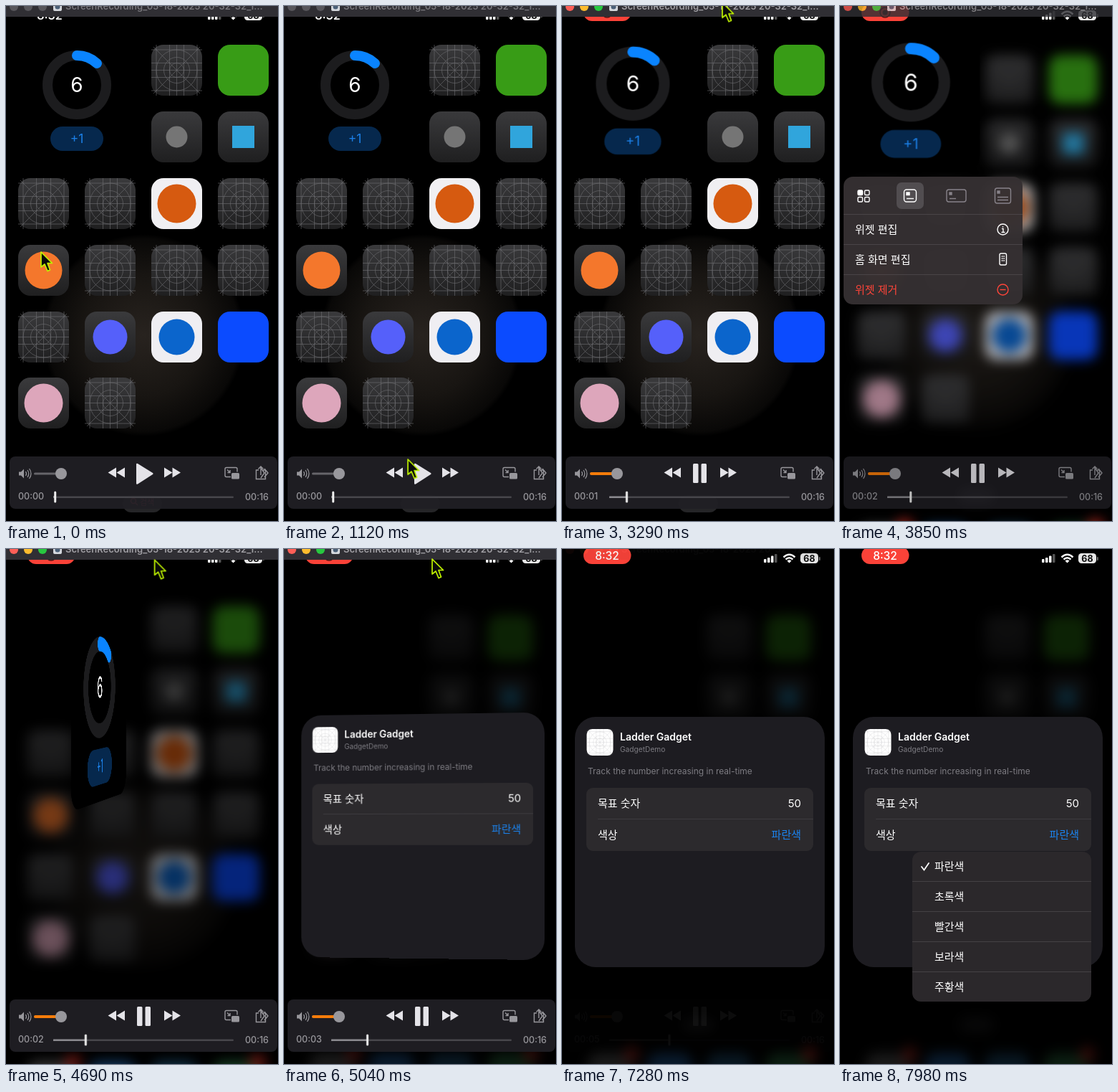
These frames come from a looping animation (380 px wide and 718 px high, 8 s). An HTML page:

```html
<!DOCTYPE html>
<html lang="ko">
<head>
<meta charset="utf-8">
<title>Home screen widget</title>
<style>
html, body { margin: 0; width: 100%; height: 100%; overflow: hidden; background: #000; }
#stage { position: relative; width: 380px; height: 718px; overflow: hidden; background: #000;
  font-family: Inter, "Noto Sans CJK KR", "Noto Sans CJK", sans-serif; }
#stage > *, #chrome > svg { position: absolute; left: 0; top: 0; }
svg { display: block; overflow: visible; font-size: 15px; fill: #fff; }
.mid { text-anchor: middle; }
.end { text-anchor: end; }
.line { fill: none; stroke: currentColor; }

#stage *, #clock::after { animation-duration: 8s; animation-iteration-count: infinite;
  animation-timing-function: linear; }
#home { transform-origin: 190px 410px; animation-name: home; }
#widget { transform-origin: 100px 135px; animation-name: widget; }
#menu { transform-origin: 70px 238px; animation-name: menu; }
#config { transform-origin: 192.5px 408px; animation-name: config; }
#popup { transform-origin: 320px 422px; animation-name: popup; }
#chrome { width: 380px; height: 718px; animation-name: chrome; }
#cursor { animation-name: cursor; }
#search { animation-name: search; }
#pill { transform-origin: 63px 9px; animation-name: pill; }
#early { animation-name: early; }
#record { animation-name: record; }
#late { animation-name: late; }
.active { animation-name: active; }
.idle { animation-name: idle; }
#head { animation-name: head; }
#played { transform-origin: 66px 0; animation-name: played; }
#clock { position: absolute; left: 17px; top: 676px; font: 500 12.5px/16px Inter, sans-serif; color: #98979c; }
#clock::after { content: "00:00"; animation-name: clock; }

@keyframes home {
  0%, 41.8% { transform: none; filter: blur(0) brightness(1); }
  45.2%, 55.6% { transform: scale(.96); filter: blur(9px) brightness(.72); }
  62%, 100% { transform: scale(.893); filter: blur(10px) brightness(.22); }
}
@keyframes widget {
  0%, 36% { transform: perspective(1200px); opacity: 1; animation-timing-function: ease-in-out; }
  41.1% { transform: perspective(1200px) scale(1.075); }
  45%, 55.6% { transform: perspective(1200px) scale(1.146); opacity: 1; animation-timing-function: ease-in; }
  59.4% { transform: perspective(1200px) translate(46px, 137px) scale(1.62) rotateY(90deg); opacity: 1; }
  59.41%, 100% { transform: perspective(1200px) translate(46px, 137px) scale(1.62) rotateY(90deg); opacity: 0; }
}
@keyframes config {
  0%, 59.39% { transform: perspective(1200px) translate(-46px, -136px) scale(.77) rotateY(-90deg); opacity: 0; }
  59.4% { transform: perspective(1200px) translate(-46px, -136px) scale(.77) rotateY(-90deg); opacity: 1; animation-timing-function: ease-out; }
  63% { transform: perspective(1200px) translate(-.5px, -8px) scale(.977) rotateY(-5deg); animation-timing-function: ease-out; }
  66%, 100% { transform: perspective(1200px); opacity: 1; }
}
@keyframes menu {
  0%, 42.5% { transform: scale(.2); opacity: 0; animation-timing-function: ease-out; }
  46%, 54.5% { transform: none; opacity: 1; animation-timing-function: ease-in; }
  56.5%, 100% { transform: scale(.3); opacity: 0; }
}
@keyframes popup {
  0%, 94.4% { transform: scale(.2); opacity: 0; animation-timing-function: ease-out; }
  98%, 100% { transform: none; opacity: 1; }
}
@keyframes chrome {
  0%, 47.4% { opacity: 1; }
  51.25%, 52.25% { opacity: 0; }
  53.75%, 86.9% { opacity: 1; }
  91.25%, 100% { opacity: 0; }
}
@keyframes cursor {
  0%, 2% { transform: translate(49px, 343px); animation-timing-function: ease-in-out; }
  14% { transform: translate(173px, 632px); }
  16.5%, 28% { transform: translate(187px, 647px); animation-timing-function: ease-in-out; }
  41.1% { transform: translate(224px, -4px); }
  42.5%, 52% { transform: translate(225px, -34px); animation-timing-function: ease-out; }
  56% { transform: translate(208px, 16px); }
  63% { transform: translate(207px, 14px); }
  77.9%, 83% { transform: translate(206px, 17px); animation-timing-function: ease-in; }
  87%, 100% { transform: translate(206px, -34px); }
}
@keyframes search { 0%, 9% { opacity: 1; } 11%, 100% { opacity: 0; } }
@keyframes pill {
  0%, 28% { transform: scale(.3); opacity: 0; }
  31%, 100% { transform: none; opacity: 1; }
}
@keyframes early { 0%, 28% { opacity: 1; } 30%, 100% { opacity: 0; } }
@keyframes record { 0%, 81% { opacity: 1; } 83%, 100% { opacity: 0; } }
@keyframes late { 0%, 81% { opacity: 0; } 83%, 100% { opacity: 1; } }
@keyframes active { 0%, 18.74% { opacity: 0; } 18.75%, 100% { opacity: 1; } }
@keyframes idle { 0%, 18.74% { opacity: 1; } 18.75%, 100% { opacity: 0; } }
@keyframes head { 0%, 22.9% { transform: none; } 100% { transform: translateX(92px); } }
@keyframes played { 0%, 22.9% { transform: scaleX(.03); } 100% { transform: scaleX(1); } }
@keyframes clock {
  0%, 35.37% { content: "00:00"; }
  35.38%, 47.87% { content: "00:01"; }
  47.88%, 60.37% { content: "00:02"; }
  60.38%, 72.87% { content: "00:03"; }
  72.88%, 85.37% { content: "00:04"; }
  85.38%, 97.87% { content: "00:05"; }
  97.88%, 100% { content: "00:06"; }
}
</style>
</head>
<body>
<div id="stage">
  <svg id="home" width="380" height="718">
    <defs>
      <radialGradient id="glow">
        <stop offset="0" stop-color="#28231f"/><stop offset=".6" stop-color="#181512"/>
        <stop offset=".95" stop-color="#090807"/><stop offset="1" stop-color="#000"/>
      </radialGradient>
      <linearGradient id="dark" x2="0" y2="1">
        <stop stop-color="#3a3a3c"/><stop offset="1" stop-color="#1f1f20"/>
      </linearGradient>
      <g id="guides" class="line" stroke-width=".6">
        <path d="M7 0V71M25.500 0V71M35.500 0V71M45.500 0V71M64 0V71M0 7H71M0 25.500H71M0 35.500H71M0 45.500H71M0 64H71M3 3L68 68M68 3L3 68"/>
        <circle cx="35.500" cy="35.500" r="28.500"/><circle cx="35.500" cy="35.500" r="18"/><circle cx="35.500" cy="35.500" r="10"/>
      </g>
    </defs>
    <circle cx="192" cy="459" r="141" fill="url(#glow)"/>
    <g id="tiles"></g>
    <rect x="163" y="682" width="55" height="24" rx="12" fill="#252527"/>
    <g id="search" fill="#e0506c" color="#e0506c">
      <circle class="line" cx="178" cy="690" r="3.500" stroke-width="1.500"/>
      <path class="line" d="M181 693l3 3" stroke-width="1.500"/>
      <text x="187" y="696" font-size="11">검색</text>
    </g>
  </svg>

  <svg id="status" width="380" height="40">
    <text id="early" class="mid" x="61" y="19" font-size="16" font-weight="600">8:32</text>
    <g id="pill">
      <rect x="30" y="-3" width="66.500" height="24" rx="12" fill="#fa4238"/>
      <g id="record" color="#501512"><circle class="line" cx="63" cy="9" r="7" stroke-width="1.500"/><circle cx="63" cy="9" r="3.500" fill="#501512"/></g>
      <text id="late" class="mid" x="63" y="15" font-size="15.500" font-weight="500">8:32</text>
    </g>
    <rect x="282" y="14" width="3.500" height="5" rx="1"/><rect x="287" y="12" width="3.500" height="7" rx="1"/>
    <rect x="292" y="9.500" width="3.500" height="9.500" rx="1"/><rect x="297" y="7" width="3.500" height="12" rx="1" fill="#555"/>
    <path class="line" color="#fff" stroke-width="2.500" d="M309.500 11.500Q317.500 4 325.500 11.500M312.500 14.500Q317.500 10 322.500 14.500"/>
    <path d="M314.500 16.500Q317.500 14 320.500 16.500L317.500 19.500Z"/>
    <rect x="333" y="6" width="25" height="14" rx="4.500" fill="#e8e8e8"/><rect x="359" y="11" width="1.800" height="5" rx=".9" fill="#777"/>
    <text class="mid" x="345.500" y="17.500" font-size="12.500" font-weight="700" fill="#111">68</text>
  </svg>

  <svg id="widget" width="380" height="718">
    <rect x="17" y="52" width="166" height="166" rx="20" fill="#000"/>
    <circle class="line" cx="99" cy="110" r="41" color="#1c1c1e" stroke-width="14"/>
    <path class="line" d="M99 69A41 41 0 0 1 127 80" color="#0a84ff" stroke-width="14" stroke-linecap="round"/>
    <text class="mid" x="99" y="120" font-size="28">6</text>
    <rect x="62" y="168" width="74" height="34" rx="17" fill="#06284d"/>
    <text class="mid" x="99" y="191" font-size="17.500" fill="#1b7fe6">+1</text>
  </svg>

  <svg id="menu" width="380" height="718">
    <rect x="5" y="238" width="250" height="178" rx="13" fill="#353032" fill-opacity=".97"/>
    <rect x="79" y="246" width="38" height="37" rx="7" fill="#514d50"/>
    <path d="M5 290.500H255M5 332.500H255M5 374.500H255" stroke="#504b4d" stroke-width=".8"/>
    <g class="line" color="#fff" stroke-width="1.400">
      <rect x="25" y="257" width="6.500" height="6.500" rx="1.500" fill="#fff"/><rect x="34.500" y="257" width="6.500" height="6.500" rx="1.500"/>
      <rect x="25" y="266.500" width="6.500" height="6.500" rx="1.500"/><rect x="34.500" y="266.500" width="6.500" height="6.500" rx="1.500"/>
      <rect x="89.500" y="256" width="17" height="17" rx="3.500"/><path d="M93 268.500h10"/><rect x="93" y="260" width="4" height="3.500" fill="#fff"/>
      <g stroke="#88838a">
        <rect x="149" y="256" width="27" height="17" rx="3"/><path d="M153 268.500h9"/><rect x="153" y="260" width="3" height="3" fill="#88838a"/>
        <rect x="216.500" y="254" width="22" height="21" rx="3"/><path d="M220 266.500h15M220 270.500h15"/><rect x="220" y="258" width="3" height="3" fill="#88838a"/>
      </g>
      <circle cx="227.500" cy="311.500" r="7.500"/><path d="M226 310.500h2v4.500M225.500 315.500h5M227.500 307v1.500"/>
      <rect x="223" y="345" width="9.500" height="16" rx="2"/><path d="M225.500 349h4.500M225.500 352h4.500M225.500 355h4.500" stroke-dasharray="1.200 .5"/>
      <g stroke="#ff453a"><circle cx="227.500" cy="395.500" r="7.500"/><path d="M223.500 395.500h8"/></g>
    </g>
    <text x="21" y="316.500">위젯 편집</text><text x="21" y="358.500">홈 화면 편집</text>
    <text x="21" y="400.500" fill="#ff453a">위젯 제거</text>
  </svg>

  <svg id="config" width="380" height="718">
    <rect x="18" y="234" width="349" height="349" rx="29" fill="#1d1c21"/>
    <rect x="34.500" y="251" width="37" height="37" rx="8"/>
    <use href="#guides" transform="translate(34.500 251) scale(.52)" color="#c4c4c8"/>
    <text x="81" y="267" font-size="14" font-weight="600">Ladder Gadget</text>
    <text x="81" y="283" font-size="10.200" fill="#7d7c82">GadgetDemo</text>
    <text x="36" y="314" font-size="12" fill="#7d7c82">Track the number increasing in real-time</text>
    <rect x="34" y="333" width="317" height="88" rx="9" fill="#2c2a2d"/>
    <path d="M50 376.500H351" stroke="#3d3b3f"/>
    <text x="50" y="360">목표 숫자</text><text class="end" x="334" y="360">50</text>
    <text x="50" y="404">색상</text><text class="end" x="334" y="404" fill="#1b84f0">파란색</text>
  </svg>

  <svg id="popup" width="380" height="718">
    <rect x="101" y="422" width="250" height="209" rx="12" fill="#2b282b"/>
    <path class="line" d="M114 443l3.500 4.500 6.500-9.500" color="#fff" stroke-width="1.800" stroke-linecap="round"/>
    <g id="colours"></g>
  </svg>

  <div id="chrome">
    <svg width="380" height="718">
      <rect width="380" height="15" fill="#302f34"/>
      <g class="idle" fill="#57565b"><circle cx="11" cy="1" r="6"/><circle cx="31" cy="1" r="6"/><circle cx="51" cy="1" r="6"/></g>
      <g class="active"><circle cx="11" cy="1" r="6" fill="#ff5f57"/><circle cx="31" cy="1" r="6" fill="#febc2e"/><circle cx="51" cy="1" r="6" fill="#28c840"/></g>
      <rect x="66" y="-7" width="12" height="14" rx="2" fill="#d5d8dd"/><circle cx="72" cy="1" r="3.500" fill="#4b6078"/>
      <g font-size="13" font-weight="600">
        <text class="idle" x="83" y="5" fill="#77767b">ScreenRecording_05-18-2025 20-32-32_1…</text>
        <text class="active" x="83" y="5" fill="#a09fa4">ScreenRecording_05-18-2025 20-32-32_1…</text>
      </g>

      <rect x="5" y="628" width="374" height="73" rx="8" fill="#201f25" fill-opacity=".94"/>
      <g fill="#98979c" color="#98979c">
        <path d="M18 649.500h3l4-4v13l-4-4h-3z"/>
        <path class="line" d="M27.500 649q2 3 0 6M30 647q3.500 5 0 10M32.500 645q5 7 0 14" stroke-width="1.200"/>
        <rect x="39" y="650.500" width="38" height="3" rx="1.500" fill="#66656a"/>
        <rect class="active" x="39" y="650" width="36" height="4" rx="2" fill="#f57c0a"/>
        <circle cx="77" cy="652" r="8"/>
        <g class="line" stroke-width="1.400">
          <path d="M314 656.500h-6q-2 0-2-2v-9q0-2 2-2h13q2 0 2 2v4M309 646.500l4 4M313 647v3.500h-3.500"/>
          <path d="M353 647h-3.500v12.500h13V647H359M356 654v-11.500M352.500 645.500l3.500-3.500 3.500 3.500M356 644l5 7-5 7M361 645l5 6-5 6"/>
        </g>
        <rect x="315" y="651" width="11" height="8.500" rx="1.500"/>
        <rect x="66" y="683.500" width="252" height="2.500" rx="1.200" fill="#47464b"/>
        <text class="end" x="367" y="688.500" font-size="12.500" font-weight="500">00:16</text>
      </g>
      <rect id="played" x="66" y="683.500" width="94" height="2.500" fill="#8a898e"/>
      <rect id="head" x="67.200" y="676.500" width="3" height="16" rx="1.500" fill="#eee"/>
      <g fill="#e4e3e8">
        <path d="M154 643.500v14l-11.500-7zM166 643.500v14l-11.500-7zM221 643.500v14l11.500-7zM232.500 643.500v14l11.500-7z"/>
        <path class="idle" d="M182 639q0-2 2-1l21 13q1.500 1 0 2l-21 13.500q-2 1-2-1z"/>
        <g class="active"><rect x="183" y="638" width="7.500" height="27" rx="1.500"/><rect x="194.500" y="638" width="7.500" height="27" rx="1.500"/></g>
      </g>
    </svg>
    <span id="clock"></span>
  </div>

  <svg id="cursor" width="20" height="30">
    <path d="M0 0V21L5 17L9 26.500L12.500 25L9 15.500H15.500Z" fill="#0a0a0a" stroke="#c0f400" stroke-width="1.700" stroke-linejoin="round"/>
  </svg>
</div>
<script>
const columns = [17, 110, 203, 296];
const rows = [54, 147, 240, 333, 426, 518];

const tile = (x, y, fill, inner = "") =>
  `<g transform="translate(${x} ${y})"><rect width="71" height="71" rx="17" fill="${fill}"/>${inner}</g>`;
const disc = (r, fill) => `<circle cx="35.500" cy="35.500" r="${r}" fill="${fill}"/>`;
const dark = "url(#dark)";

// Keys are column + row; every other slot holds a blank template icon.
const apps = {
  "30": ["#389c16"],
  "21": [dark, disc(15, "#757575")],
  "31": [dark, '<rect x="20" y="20" width="31" height="31" fill="#30a5dc"/>'],
  "22": ["#f0eff2", disc(27, "#d65a10")],
  "03": [dark, disc(26, "#f4772c")],
  "14": [dark, disc(24, "#5560fa")],
  "24": ["#efeef2", disc(25, "#0b65cc")],
  "34": ["#0b4bff"],
  "05": [dark, disc(27, "#dda6bb")]
};
const blank = [dark, '<use href="#guides" color="#707073"/>'];

let home = "";
rows.forEach((y, r) => columns.forEach((x, c) => {
  const underWidget = r < 2 && c < 2, pastLast = r === 5 && c > 1;
  if (!underWidget && !pastLast) home += tile(x, y, ...(apps[`${c}${r}`] || blank));
}));
["#777", "#2b7cd0", "#286c9c", "#348a50"].forEach((fill, c) => home += tile(columns[c], 738, fill));
for (const x of [86, 364]) home += `<circle cx="${x}" cy="740" r="12" fill="#f03428"/>`;
document.getElementById("tiles").innerHTML = home;

document.getElementById("colours").innerHTML =
  ["파란색", "초록색", "빨간색", "보라색", "주황색"].map((name, i) =>
    `<text x="132" y="${448 + 42 * i}">${name}</text>` +
    (i ? `<path d="M101 ${421.5 + 42 * i}h250" stroke="#4b484b" stroke-width=".8"/>` : "")).join("");
</script>
</body>
</html>
```
